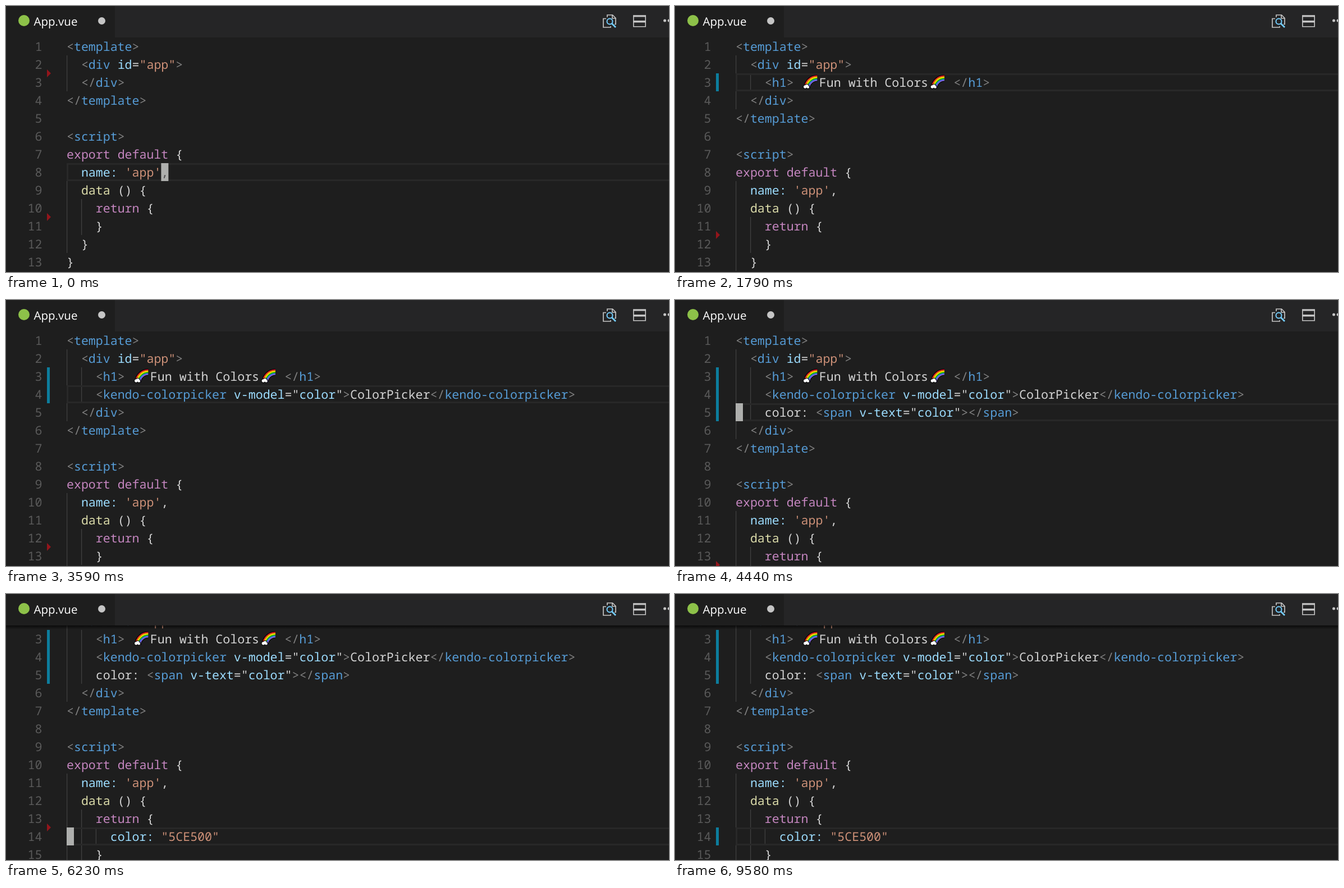
An HTML page that plays this animation: 1181 px wide and 474 px high, repeating every 9.82 s.

```html
<!DOCTYPE html>
<html lang="en">
<head>
<meta charset="utf-8">
<title>Editor</title>
<style>
html, body { margin: 0; width: 100%; height: 100%; overflow: hidden; background: #1e1e1e; }
svg { display: block; }
text { white-space: pre; text-rendering: geometricPrecision; }
#code { font: 500 21.58px "Noto Sans Mono", "DejaVu Sans Mono", monospace; }
</style>
</head>
<body>
<svg width="1181" height="474" viewBox="0 0 1181 474">
  <defs>
    <linearGradient id="shade" x2="0" y2="1">
      <stop stop-color="#000" stop-opacity=".65"/>
      <stop offset="1" stop-color="#000" stop-opacity="0"/>
    </linearGradient>
    <g id="rainbow"></g>
  </defs>
  <g id="code"></g>
  <rect id="shadow" y="56" width="1181" height="7" fill="url(#shade)"/>
  <rect width="1181" height="56" fill="#252526"/>
  <rect width="194" height="56" fill="#1e1e1e"/>
  <circle cx="32" cy="26" r="10" fill="#8dc149"/>
  <text x="49.5" y="35" fill="#fff" font-size="20.5" font-family="'Open Sans', 'Noto Sans', sans-serif">App.vue</text>
  <g fill="#c5c5c5">
    <circle cx="170.5" cy="26.5" r="6.5"/>
    <path fill-rule="evenodd" d="M1117 16.3h23v21.3h-23zM1118.6 19.6v6.500h19.800v-6.500zM1118.6 29.400v6.500h19.800v-6.500z"/>
    <circle cx="1173.500" cy="26" r="2.500"/>
    <circle cx="1181" cy="26" r="2.500"/>
  </g>
  <g fill="none" stroke="#c5c5c5" stroke-width="1.700">
    <path d="M1071 20v-4h9.500l5.500 5.500v11h-2M1080 16v6h6M1069 22.500h-5v15.500h13v-2"/>
    <g stroke="#75cfff" stroke-width="2">
      <circle cx="1075.500" cy="27.500" r="5"/>
      <path stroke-width="2.600" d="M1079 31l7 7"/>
    </g>
  </g>
</svg>
<script>
const LOOP = 9820, LEFT = 108, TOP = 56, ROW = 32, CHAR = 12.95, EMOJI = 32.3;
const COLORS = { g: '#808080', b: '#569cd6', a: '#9cdcfe', s: '#ce9178', k: '#c586c0', f: '#dcdcaa', w: '#d4d4d4' };

// Each "~" starts a token; its first letter is the colour, "e" a rainbow.
// at: line appears, bar: gutter bar appears, cut: deletion mark below disappears.
const LINES = [
  { src: '~g<~btemplate~g>' },
  { src: '~w  ~g<~bdiv ~aid~w=~s"app"~g>', cut: 550 },
  { src: '~w    ~g<~bh1~g> ~e~wFun with Colors~e~w ~g</~bh1~g>', at: 380, bar: 550 },
  { src: '~w    ~g<~bkendo-colorpicker ~av-model~w="~acolor~w"~g>~wColorPicker~g</~bkendo-colorpicker~g>', at: 2170, bar: 2340 },
  { src: '~w    color: ~g<~bspan ~av-text~w="~acolor~w"~g></~bspan~g>', at: 4200, bar: 4390 },
  { src: '~w  ~g</~bdiv~g>' },
  { src: '~g</~btemplate~g>' },
  { src: '' },
  { src: '~g<~bscript~g>' },
  { src: '~kexport default~w {' },
  { src: "~w  ~aname: ~s'app'~w,", start: true },
  { src: '~w  ~fdata~w () {' },
  { src: '~w    ~kreturn~w {', cut: 6460 },
  { src: '~w      ~acolor: ~s"5CE500"', at: 6230, bar: 6460 },
  { src: '~w    }' },
  { src: '~w  }' },
  { src: '~w}' }
];
const BLINKS = [80, 380, 860, 1330, 1790, 2170, 2660, 3120, 3590, 4140, 4670, 5220,
  5680, 6140, 6780, 7250, 7710, 8170, 8710, 9180, 9580];

const code = document.getElementById('code');
const shadow = document.getElementById('shadow');
const rect = (x, y, w, h, fill) => `<rect x="${x}" y="${y}" width="${w}" height="${h}" fill="${fill}"/>`;
const text = (x, y, fill, str, extra = '') =>
  `<text x="${x}" y="${y + 24}" fill="${fill}" ${extra}>${str.replace(/</g, '&lt;')}</text>`;

function rainbow() {
  const arc = (r, color, width) =>
    `<path d="M${26 - r} 24A${r} ${r} 0 0 1 26 ${24 - r}" fill="none" stroke="${color}" stroke-width="${width}"/>`;
  const puffs = grow => [[4.5, 21, 2.8], [7.5, 19.5, 2.8], [9.5, 21.5, 2.3]]
    .map(([x, y, r]) => `<circle cx="${x}" cy="${y}" r="${r + grow}"/>`).join('');
  const bands = ['#e81224', '#f7a30a', '#fff100', '#16c60c', '#3b78ff', '#886ce4'];
  return arc(18.5, '#000', 12) + bands.map((c, i) => arc(22.6 - i * 1.65, c, 1.7)).join('') +
    puffs(1) + `<g fill="#fff">${puffs(0)}</g>`;
}

function drawTokens(src, y) {
  let x = LEFT, out = '';
  for (const [kind, ...chars] of src.split('~').slice(1)) {
    if (kind === 'e') {
      out += `<use href="#rainbow" x="${x + 2.8}" y="${y + 3}"/>`;
      x += EMOJI;
    } else {
      const str = chars.join('');
      if (str.trim()) out += text(x, y, COLORS[kind], str);
      x += chars.length * CHAR;
    }
  }
  return out;
}

function render(t) {
  const lines = LINES.filter(l => !l.at || t >= l.at);
  const scroll = t >= 6230 ? 56 : 0;
  const current = lines.filter(l => l.at).sort((a, b) => b.at - a.at)[0] || lines.find(l => l.start);
  const cursorOn = BLINKS.filter(b => t >= b).length % 2 === 0;
  let out = '';
  lines.forEach((line, i) => {
    const y = TOP + i * ROW - scroll;
    const indent = line.src.replace(/~./g, '').search(/\S|$/);
    for (let col = 0; col < indent; col += 2) out += rect(LEFT + col * CHAR, y, 1.3, ROW, '#404040');
    if (line === current) {
      out += `<rect x="${LEFT + 1.5}" y="${y + 1.5}" width="1100" height="${ROW - 3}" fill="none" stroke="#282828" stroke-width="3"/>`;
    }
    out += text(64.5, y, '#5a5a5a', String(i + 1), 'text-anchor="end"') + drawTokens(line.src, y);
    if (t >= line.bar) out += rect(73, y, 5, ROW, '#0c7d9d');
    if (t < line.cut) out += `<path d="M73 ${y + ROW - 7}l7 7l-7 7z" fill="#94151b"/>`;
    if (line === current && cursorOn) {
      const x = LEFT + (line.start ? 13 * CHAR : 0);
      out += rect(x, y, 13, ROW, '#aeafad');
      if (line.start) out += text(x, y, '#515052', ',');
    }
  });
  shadow.setAttribute('visibility', scroll ? 'visible' : 'hidden');
  return out;
}

let shown;
function frame() {
  const next = render(performance.now() % LOOP);
  if (next !== shown) code.innerHTML = shown = next;
  requestAnimationFrame(frame);
}
document.getElementById('rainbow').innerHTML = rainbow();
frame();
</script>
</body>
</html>
```
